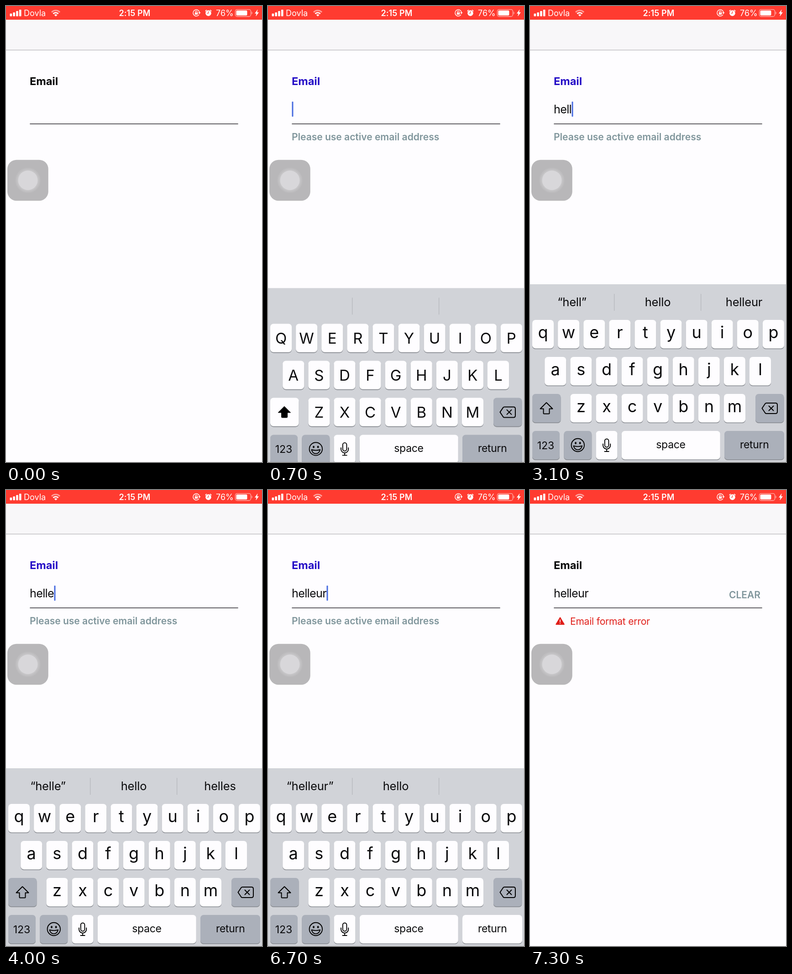
Animation, 561 px wide and 998 px high, one loop 8000 ms. Source, as an HTML page:

```html
<!DOCTYPE html>
<html lang="en">
<head>
<meta charset="utf-8">
<title>Email field</title>
<style>
  html, body { margin: 0; width: 100%; height: 100%; overflow: hidden; background: #fefdff; }
  svg { display: block; width: 100%; height: 100%; font-family: Inter, "Liberation Sans", sans-serif; }
</style>
</head>
<body>
<svg id="stage" viewBox="0 0 561 998" xmlns="http://www.w3.org/2000/svg"></svg>
<script>
const LOOP = 8000, STEP = 100;
const FOCUS = 500, SHIFT_OFF = 1800, RETURN_DOWN = 6700, BLUR = 6900;
const KEY_W = 47, KEY_H = 62.4, PITCH = 56.1, KEYBOARD_H = 389;
const WHITE = '#fefdff', GRAY_KEY = '#abb0ba', INK = '#0a0a0c', MUTED = '#7f959b', RED = '#e01f1a';

const ROWS = [
  { letters: 'qwertyuiop', x: 5, y: 687 },
  { letters: 'asdfghjkl', x: 32.2, y: 768 },
  { letters: 'zxcvbnm', x: 88.4, y: 849 },
];

// time, typed text, suggestions
const INPUTS = [
  [600, '', []],
  [2300, 'h', ['“h”', 'he', 'have']],
  [2600, 'he', ['“he”', 'hey', 'her']],
  [2800, 'hel', ['“hel”', 'hello', 'help']],
  [3100, 'hell', ['“hell”', 'hello', 'helleur']],
  [4000, 'helle', ['“helle”', 'hello', 'helles']],
  [5100, 'helleu', ['“helleu”', 'hello']],
  [5500, 'helleur', ['“helleur”', 'hello']],
];

// start, end, letter
const PRESSES = [
  [2000, 2300, 'h'], [2300, 2600, 'e'], [2800, 3100, 'l'], [3700, 4000, 'e'], [4700, 5100, 'u'],
];

const clamp = v => Math.max(0, Math.min(1, v));

// Critically damped spring: 1 at the start, settling to 0.
function settle(ms) {
  const k = 0.023 * Math.max(0, ms);
  return (1 + k) * Math.exp(-k);
}

function text(x, y, size, content, { weight = 400, fill = INK, anchor = 'start', spacing = 0, id = '' } = {}) {
  return `<text ${id && `id="${id}"`} x="${x}" y="${y}" font-size="${size}" font-weight="${weight}" fill="${fill}"
    text-anchor="${anchor}" letter-spacing="${spacing}">${content}</text>`;
}

const rect = (x, y, w, h, fill, r = 0) =>
  `<rect x="${x}" y="${y}" width="${w}" height="${h}" rx="${r}" fill="${fill}"/>`;
const circle = (x, y, r, fill) => `<circle cx="${x}" cy="${y}" r="${r}" fill="${fill}"/>`;
const path = (d, stroke, width = 2, fill = 'none', extra = '') =>
  `<path d="${d}" stroke="${stroke}" stroke-width="${width}" fill="${fill}"
    stroke-linecap="round" stroke-linejoin="round" ${extra}/>`;
const key = (x, y, w, fill = WHITE) =>
  rect(x, y + 1.6, w, KEY_H, '#888b91', 7) + rect(x, y, w, KEY_H, fill, 7);

function statusBar() {
  const bars = [6, 8.5, 11.5, 14.5].map((h, i) => rect(8.5 + i * 6.8, 22.5 - h, 4.6, h, '#fff', 1)).join('');
  const wifi = path('M100 13.6A12.5 12.5 0 0 1 118 13.6', '#fff', 3, 'none', 'opacity=".5" style="stroke-linecap:butt"')
    + path('M103.4 17A8 8 0 0 1 114.6 17', '#fff', 2.8, 'none', 'style="stroke-linecap:butt"')
    + path('M109 22.3L106 19.5Q109 17.2 112 19.5Z', '#fff', .5, '#fff');
  const lock = path('M422.6 19.3A7 7 0 1 1 424 14.5', '#fff', 1.4)
    + path('M421.6 14.2h4.6l-2.3 3z', '#fff', .5, '#fff')
    + rect(413.8, 14.3, 6.4, 4.8, '#fff', .8)
    + path('M415 14.3v-1.4a2 2 0 0 1 4 0v1.4', '#fff', 1.2);
  const alarm = circle(443.5, 15.6, 6.3, '#fff')
    + path('M437.2 11.2Q437.6 9.6 439.6 9M449.8 11.2Q449.4 9.6 447.4 9', '#fff', 1.5)
    + path('M443.5 12v4h-3', '#ff3b30', 1.2);
  const battery = '<rect x="502.5" y="7.6" width="34" height="15.4" rx="4" fill="none" stroke="#fff" stroke-opacity=".6" stroke-width="1.3"/>'
    + rect(504.5, 9.8, 24, 11, '#fff', 2)
    + path('M538.6 12.8q2 2.5 0 5z', '#ffb1ac', .6, '#ffb1ac')
    + path('M551 8.5L545.5 16.2H549L547.8 22L553.6 14H550Z', '#fff', .5, '#fff');
  return rect(0, 0, 561, 30, '#ff3b30') + bars + wifi + lock + alarm + battery
    + text(39, 22, 18, 'Dovla', { fill: '#fff' })
    + text(282, 22, 18, '2:15 PM', { weight: 600, fill: '#fff', anchor: 'middle', spacing: .1 })
    + text(460, 22, 18, '76%', { fill: '#fff' });
}

function assistiveButton() {
  return rect(3, 336.7, 89.7, 89.5, '#b8b7b9', 20) + circle(48, 381.5, 27.5, '#bebdbf')
    + circle(48, 381.5, 24.5, '#c5c4c6') + circle(48, 381.5, 21.5, '#d8d7da');
}

function form(typed, focused, submitted) {
  const warning = path('M66 279.2L74.8 294H57.2Z', RED, 2, RED)
    + rect(65.2, 283.5, 1.6, 6, WHITE) + rect(65.2, 291, 1.6, 1.7, WHITE);
  const footer = submitted
    ? warning + text(88, 294.6, 21, 'Email format error', { fill: RED, spacing: -.2 })
      + text(436, 237.3, 21, 'CLEAR', { weight: 600, fill: MUTED })
    : focused ? text(52, 294, 21, 'Please use active email address', { weight: 600, fill: MUTED }) : '';
  return text(52, 173.4, 23.5, 'Email', { weight: 700, fill: focused ? '#240bc6' : '#000' })
    + text(52, 235, 25, typed, { id: 'field', spacing: -.6 })
    + rect(52.3, 257.2, 456.4, 1.6, '#3c3b40') + footer;
}

function popup(x, y, letter) {
  const shape = `M${x - 19.5} ${y - 84}q0-13 13-13h60q13 0 13 13v48c0 20-19.5 20-19.5 40v51.4q0 7-7 7h-33q-7 0-7-7v-51.4c0-20-19.5-20-19.5-40z`;
  return `<path d="${shape}" fill="${WHITE}" filter="url(#lift)"/>`
    + text(x + KEY_W / 2, y - 35, 55, letter, { anchor: 'middle' });
}

function functionKeys(upper, returnDown) {
  const arrow = path('M36 868L49.5 881.5H42.5V891q0 1.5-1.5 1.5H31q-1.5 0-1.5-1.5V881.5H22.5Z',
    '#000', upper ? 1 : 2, upper ? '#000' : 'none');
  const erase = path('M518 869H538q4 0 4 4V888q0 4-4 4H518q-1.5 0-2.6-1.2L508.5 880.5L515.4 870.2Q516.5 869 518 869Z', '#000')
    + path('M523.5 875.5l10 10m0-10l-10 10', '#000');
  const smiley = '<circle cx="104.8" cy="961" r="14.2" fill="none" stroke="#000" stroke-width="1.9"/>'
    + '<ellipse cx="100" cy="956.5" rx="1.9" ry="2.5"/><ellipse cx="109.6" cy="956.5" rx="1.9" ry="2.5"/>'
    + path('M95.4 962.6Q104.8 965.6 114.2 962.6Q112 971.4 104.8 971.4T95.4 962.6Z', '#000', 1.9);
  const mic = '<rect x="163.8" y="947.5" width="8.6" height="18" rx="4.3" fill="none" stroke="#000" stroke-width="1.9"/>'
    + path('M160 958.5v3a8.1 8.1 0 0 0 16.2 0v-3M168.1 970v5M163.5 975h9.2', '#000', 1.9);
  const label = (x, content) => text(x, 968, 23, content, { anchor: 'middle', spacing: -.3 });
  return key(5, 849, 62.5, upper ? WHITE : GRAY_KEY) + arrow
    + key(494, 849, 62.5, GRAY_KEY) + erase
    + key(5, 930, 60, GRAY_KEY) + text(34.5, 969.5, 23, '123', { anchor: 'middle' })
    + key(74.3, 930, 61, GRAY_KEY) + smiley
    + key(144.5, 930, KEY_W, WHITE) + mic
    + key(200.8, 930, 216, WHITE) + label(308.5, 'space')
    + key(426, 930, 131, returnDown ? WHITE : GRAY_KEY) + label(491.8, 'return');
}

function keyboard(t, suggestions, offset) {
  const upper = t < SHIFT_OFF;
  const pressed = PRESSES.find(([from, to]) => t >= from && t < to)?.[2];
  let keys = '', bubble = '';
  for (const { letters, x, y } of ROWS) {
    [...letters].forEach((letter, i) => {
      const left = x + i * PITCH, middle = left + KEY_W / 2;
      keys += key(left, y, KEY_W);
      if (letter === pressed) bubble = popup(left, y, letter);
      else if (upper) keys += text(middle, y + 43.7, 33, letter.toUpperCase(), { anchor: 'middle' });
      else keys += text(middle, y + 40, 36, letter, { anchor: 'middle' });
    });
  }
  const words = suggestions.map((word, i) =>
    text([92, 280, 469][i], 657, 25.5, word, { anchor: 'middle', spacing: -.2 })).join('');
  return `<g transform="translate(0 ${offset.toFixed(1)})">`
    + rect(0, 609, 561, 400, '#d1d3d8') + rect(184, 630, 1.3, 37, '#b5b8bd') + rect(374, 630, 1.3, 37, '#b5b8bd')
    + words + keys + functionKeys(upper, t >= RETURN_DOWN && t < RETURN_DOWN + STEP) + bubble + '</g>';
}

// Solid after each input, then fading out and back in.
function caretOpacity(age) {
  if (age < 500) return 1;
  return age < 1000 ? clamp(1 - (age - 400) / 300) : clamp((age - 900) / 300);
}

const stage = document.getElementById('stage');
const defs = `<defs><filter id="lift" x="-30%" y="-20%" width="160%" height="140%">
  <feDropShadow dx="0" dy="1.5" stdDeviation="3.5" flood-color="#000" flood-opacity=".32"/></filter></defs>`;

function render(t) {
  const submitted = t >= BLUR, focused = t >= FOCUS && !submitted;
  const [inputTime, typed, suggestions] = INPUTS.findLast(([time]) => t >= time) ?? INPUTS[0];
  const hidden = submitted ? 1 - settle(t - BLUR + 50) : settle(t - FOCUS + 50);

  stage.innerHTML = defs + rect(0, 0, 561, 998, WHITE) + rect(0, 30, 561, 66, '#f8f7f9')
    + rect(0, 95.8, 561, 1.3, '#b9b8bb') + statusBar() + form(typed, focused, submitted) + assistiveButton()
    + (t >= FOCUS && hidden < .995 ? keyboard(t, suggestions, hidden * KEYBOARD_H) : '');

  if (focused) {
    const width = document.getElementById('field').getComputedTextLength();
    stage.insertAdjacentHTML('beforeend',
      `<g opacity="${caretOpacity(t - inputTime)}">${rect(52.4 + width, 209.3, 3, 33, '#486ce0', 1)}</g>`);
  }
}

let shown = -1;
function tick() {
  const t = Math.floor(performance.now() % LOOP / STEP) * STEP;
  if (t !== shown) render(shown = t);
  requestAnimationFrame(tick);
}
tick();
</script>
</body>
</html>
```
